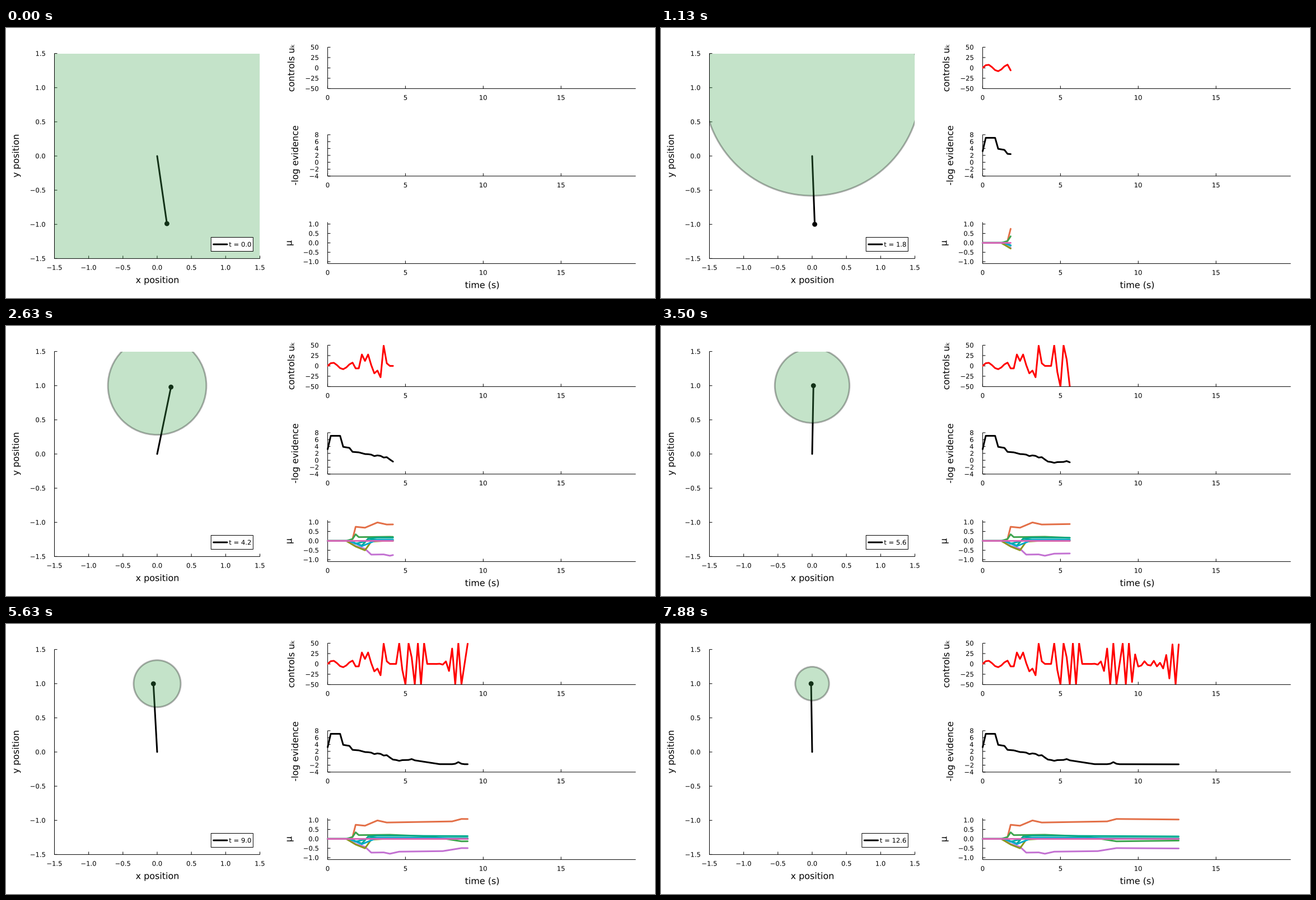
Animation of 1159x483 px, one loop 8000 ms. Source, as a matplotlib script:

```python
import numpy as np
import matplotlib
import matplotlib.pyplot as plt
from matplotlib.animation import FuncAnimation
from matplotlib.patches import Circle, PathPatch, Rectangle
from matplotlib.textpath import TextPath
from matplotlib.transforms import Affine2D

W, H, DPI = 1159, 483, 64
PT = 72 / DPI          # points per pixel
STEPS, DT = 64, 0.2
SMALL, LARGE = 11.6, 15.95

matplotlib.rcParams["font.family"] = "DejaVu Sans"
matplotlib.rcParams["path.snap"] = False
fig = plt.figure(figsize=(W / DPI, H / DPI), dpi=DPI, facecolor="white")
ax = fig.add_axes([0, 0, 1, 1])
ax.set_xlim(0, W)
ax.set_ylim(H, 0)
ax.axis("off")


def line(xs, ys, color="black", width=1.0, z=1, clip=None):
    art, = ax.plot(xs, ys, color=color, lw=width * PT, zorder=z, snap=False,
                   solid_capstyle="butt" if width <= 1 else "round",
                   solid_joinstyle="round")
    if clip is not None:
        art.set_clip_path(clip)
    return art


def glyphs(x, y, s, size=SMALL, align="center", upright=False):
    """Outline of a text, placed by its ink edge and baseline."""
    path = TextPath((0, 0), s, size=size)
    box = path.get_extents()
    edge = {"left": box.x0, "center": (box.x0 + box.x1) / 2, "right": box.x1}[align]
    place = Affine2D().translate(-edge, 0).scale(1, -1)
    if upright:
        place.rotate(-np.pi / 2)
    return path.transformed(place.translate(x, y))


def text(*args, z=1, **kw):
    return ax.add_patch(PathPatch(glyphs(*args, **kw), fc="black", lw=0, zorder=z))


class Panel:
    """Maps data to pixels and draws the left and bottom axis."""

    def __init__(self, box, xlim, ylim, xticks, yticks, xfmt, yfmt):
        self.box, self.xlim, self.ylim = box, xlim, ylim
        x0, y0, x1, y1 = box
        line([x0, x0], [y0, y1])
        line([x0, x1], [y1, y1])
        for v in xticks:
            px = self.x(v)
            line([px, px], [y1, y1 - 5])
            text(px, y1 + 20.2, self.label(v, xfmt))
        for v in yticks:
            py = self.y(v)
            line([x0, x0 + 5], [py, py])
            text(x0 - 16.6, py + 4.2, self.label(v, yfmt), align="right")
        self.clip = Rectangle((x0, y0), x1 - x0, y1 - y0, fc="none", ec="none")
        ax.add_patch(self.clip)

    @staticmethod
    def label(v, fmt):
        return format(v, fmt).replace("-", "\u2212")

    def x(self, v):
        x0, _, x1, _ = self.box
        return x0 + (v - self.xlim[0]) / (self.xlim[1] - self.xlim[0]) * (x1 - x0)

    def y(self, v):
        _, y0, _, y1 = self.box
        return y1 - (v - self.ylim[0]) / (self.ylim[1] - self.ylim[0]) * (y1 - y0)


# ---- panels -------------------------------------------------------------
half = np.arange(-1.5, 1.6, 0.5)
arena = Panel((86.5, 45.6, 453.4, 412.4), (-1.5, 1.5), (-1.5, 1.5),
              half, half, ".1f", ".1f")


def strip(row, ylim, yticks, yfmt):
    bottom = 108.4 + 156.5 * row
    return Panel((574.4, bottom - 74, 1124.6, bottom), (0, 19.8), ylim,
                 range(0, 20, 5), yticks, "d", yfmt)


ctrl = strip(0, (-50, 50), range(-50, 51, 25), "d")
evid = strip(1, (-4, 8), range(-4, 9, 2), "d")
mean = strip(2, (-1.1, 1.1), np.arange(-1, 1.1, 0.5), ".1f")

text(270, 456.2, "x position", LARGE)
text(850, 465.2, "time (s)", LARGE)
text(22.9, 229, "y position", LARGE, upright=True)
text(514.7, 71.5, "controls u\u2096", LARGE, upright=True)
text(521.6, 228, "-log evidence", LARGE, upright=True)
text(510.3, 384.5, "\u03bc", LARGE, upright=True)

# ---- data ---------------------------------------------------------------
step = np.arange(STEPS)
time = step * DT
zigzag = np.where(step % 2, -1, 1)
rng = np.random.default_rng(4)


def knots(*pairs):
    """Piecewise linear curve through step, value, step, value, ..."""
    return np.interp(step, pairs[::2], pairs[1::2])


def bump(centre, width):
    return np.exp(-((step - centre) / width) ** 2)


def during(first, last):
    return (step >= first) & (step <= last)


def wave(cycles):
    return np.cos(2 * np.pi * cycles)


# gentle start, swing-up pushes, then bursts of corrections
chirp = step - 23
control = (
    8 * wave(step / 6.5 - 0.25) * during(0, 8)
    - 6 * during(9, 10)
    + 24 * wave((step - 12) / 9) * (1 - 0.5 * zigzag) * during(11, 17)
    + 49 * bump(18, 0.7)
    + 75 * wave(0.28 * chirp + 0.0015 * chirp ** 3) * during(23, 31)
    + 55 * zigzag * (44 - step) * bump(44, 3)
    + 7 * np.sin(2.2 * step) * during(48, 57)
    - 52 * zigzag * bump(62, 3.2)).clip(-50, 50)

evidence = knots(0, 3.2, 1, 7.1, 4, 7.1, 5, 3.9, 7, 3.6, 8, 2.45, 10, 2.3,
                 14, 1.4, 19, 0.85, 21, -0.6, 27, -0.45, 36, -1.7, 63, -1.75)
evidence += rng.uniform(-0.25, 0.25, STEPS) * during(11, 27) + 0.6 * bump(42, 0.8)

means = [
    ("#e36f47", knots(7, 0, 8, 0.1, 9, 0.75, 12, 0.7, 16, 0.98, 19, 0.87,
                      40, 0.93, 43, 1.06, 63, 1.03)),
    ("#3ea44e", knots(6, 0, 8, 0.1, 9, 0.35, 10, 0.2, 20, 0.22, 33, 0.13,
                      43, -0.13, 63, -0.09)),
    ("#c371d2", knots(6, 0, 9, -0.27, 12, -0.42, 14, -0.73, 18, -0.72,
                      20, -0.79, 23, -0.68, 37, -0.65, 43, -0.49, 63, -0.51)),
    ("#00aaae", knots(7, 0, 9, -0.15, 14, 0.06, 63, 0.03)),
    ("#00a98d", knots(7, 0, 11, -0.25, 13, 0.12, 16, 0.17, 63, 0.13)),
    ("#8e971e", knots(6, 0, 9, -0.3, 12, -0.5, 14, -0.04, 18, 0)),
    ("#00a9cc", knots(7, 0, 11, -0.28, 16, 0.06, 36, 0.05, 42, 0)),
    ("#dd65b6", np.zeros(STEPS)),
]

# angle from hanging down: dying sway, swing-up, balance
angle = 0.143 * np.exp(-step / 8) * wave(step / 10)
angle += knots(11, 0, 14, 1.5, 17, 2.75, 21, 2.93, 25, 3.1, 35, 3.172,
               45, 3.197, 54, 3.157)

# ---- moving parts -------------------------------------------------------
scale = arena.x(1) - arena.x(0)
rod = line([], [], width=3, z=3)
bob = Circle((0, 0), 4.4, fc="black", ec="none", zorder=3)
ax.add_patch(bob)
goal = Circle((arena.x(0), arena.y(1)), 1, fc=(62 / 255, 164 / 255, 78 / 255, 0.3),
              ec=(0, 0, 0, 0.3), lw=3 * PT, zorder=4)
ax.add_patch(goal)
goal.set_clip_path(arena.clip)

legend = Rectangle((0, 374.5), 0, 25, fc="white", ec="black", lw=PT, zorder=5,
                   snap=False)
ax.add_patch(legend)
key = line([], [], width=3, z=6)
clock = text(0, 0, "t", z=6)

curves = [(line([], [], "red", 3, 3, ctrl.clip), ctrl, control),
          (line([], [], "black", 3, 3), evid, evidence)]
curves += [(line([], [], c, 3, 3), mean, v) for c, v in means]


def draw(k):
    px, py = arena.x(np.sin(angle[k])), arena.y(-np.cos(angle[k]))
    rod.set_data([arena.x(0), px], [arena.y(0), py])
    bob.center = (px, py)
    goal.set_radius(np.sqrt(10) / (DT * (k + 1)) * scale)

    n = k + 1 if k else 0
    for art, panel, values in curves:
        art.set_data(panel.x(time[:n]), panel.y(values[:n]))

    left = 366.2 if time[k] < 9.95 else 358.8
    legend.set_x(left)
    legend.set_width(441.3 - left)
    key.set_data([left + 4.3, left + 28.7], [387, 387])
    clock.set_path(glyphs(left + 32.3, 391.2, f"t = {time[k]:.1f}", align="left"))
    return []


anim = FuncAnimation(fig, draw, frames=STEPS, interval=125, repeat=True,
                     repeat_delay=0, init_func=lambda: draw(0), blit=False)
plt.show()
```
